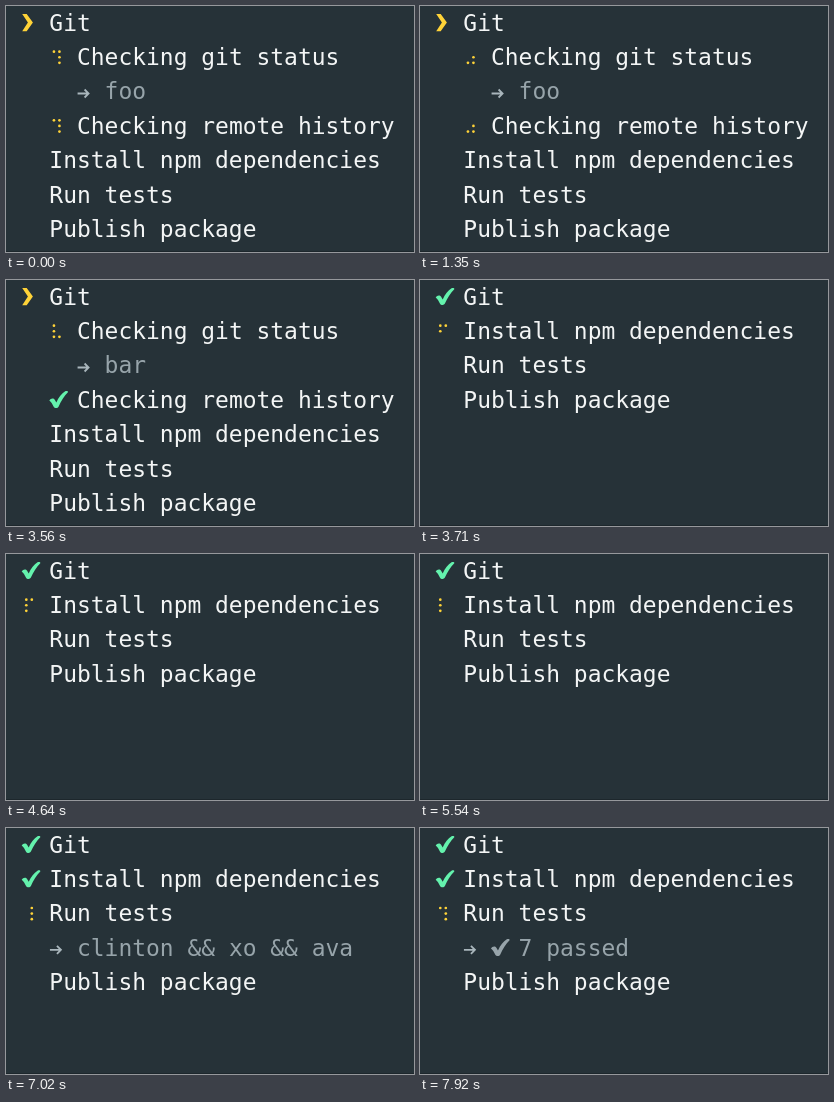
These frames come from a looping animation (408 px wide and 246 px high, 8 s). An HTML page:

```html
<!DOCTYPE html>
<html lang="en">
<head>
<meta charset="utf-8">
<title>Release tasks</title>
<style>
  html, body { margin: 0; width: 100%; height: 100%; overflow: hidden; background: #263238; }
  svg { display: block; width: 408px; height: 246px; }
  text { font: 22.95px "DejaVu Sans Mono", monospace; white-space: pre; }
</style>
</head>
<body>
<svg id="screen" viewBox="0 0 408 246"></svg>
<script>
const LOOP = 8000;
const COL = 13.82, ROW = 34.35, LEFT = 15.7, BASELINE = 24.8;
const WHITE = '#f3f5f5', DIM = '#97a4aa', YELLOW = '#ffd338', GREEN = '#64f2ad';

// Screen refreshes: [first, last, count], one every REFRESH ms until the last.
const REFRESH = 150;
const refreshes = [
  [0, 0, 1], [140, 1060, 7], [1200, 2240, 8], [2390, 3420, 8], [3560, 4490, 7],
  [4640, 5680, 8], [5830, 6870, 8], [7020, 7920, 7]
].flatMap(([first, last, count]) =>
  Array.from({ length: count }, (_, i) => i === count - 1 ? last : first + i * REFRESH));

// Spinner ticks at which the task list changes.
const TICK = 102, FIRST_TICK = 2.73;
const REMOTE_DONE = 19, GIT_DONE = 39, INSTALL_DONE = 58, TESTS_PASSED = 78;
const SPINNER = '⠋⠙⠹⠸⠼⠴⠦⠧⠇⠏';

const colX = col => LEFT + col * COL;
const at = (col, row, body) =>
  `<g transform="translate(${colX(col)} ${row * ROW})">${body}</g>`;
const text = (col, row, value, color = WHITE) =>
  at(col, row, `<text y="${BASELINE}" fill="${color}">${value.replace(/&/g, '&amp;')}</text>`);

const shape = (d, color) => `<path d="${d}" fill="${color}"/>`;
const pointer = (col, row) =>
  at(col, row, shape('M.5 8H5L11.2 16.6 5 25.2H.5L6.2 16.6Z', YELLOW));
const check = (col, row, color = GREEN) => at(col, row, shape(
  'M0 17.5C1.2 15.2 4.2 14.8 5.4 16.7L7 19.4C9.3 14.5 12.3 10.5 15.8 8.3' +
  'C17 7.7 19 7.9 18.6 9.2 14.8 13 11.8 18 9.2 23.6 8.4 25.4 5.2 25.4 4.2 23.4 3 21 1.8 18.8 0 17.5Z', color));
const arrow = (col, row) => at(col, row,
  '<path d="M.6 18.8H11.6M7.6 14.8L11.6 18.8 7.6 22.8" fill="none" stroke="#a9b6bc" stroke-width="1.8"/>');

function spinner(col, row, step) {
  const bits = SPINNER.charCodeAt(step % 10) - 0x2800;
  let dots = '';
  for (let i = 0; i < 6; i++) {
    if (bits >> i & 1) {
      dots += `<circle cx="${i < 3 ? 4.6 : 10.1}" cy="${11.3 + i % 3 * 5.6}" r="1.35" fill="${YELLOW}"/>`;
    }
  }
  return at(col, row, dots);
}

const output = (col, row, value) => arrow(col, row) + text(col + 2, row, value, DIM);
const titles = (row, ...names) => names.map((name, i) => text(2, row + i, name)).join('');

function gitView(tick) {
  const remoteDone = tick >= REMOTE_DONE;
  return pointer(0, 0) + text(2, 0, 'Git') +
    spinner(2, 1, tick) + text(4, 1, 'Checking git status') +
    output(4, 2, remoteDone ? 'bar' : 'foo') +
    (remoteDone ? check(2, 3) : spinner(2, 3, tick)) + text(4, 3, 'Checking remote history') +
    titles(4, 'Install npm dependencies', 'Run tests', 'Publish package');
}

function installView(tick) {
  return check(0, 0) + spinner(0, 1, tick - GIT_DONE) +
    titles(0, 'Git', 'Install npm dependencies', 'Run tests', 'Publish package');
}

function testView(tick) {
  const result = tick >= TESTS_PASSED
    ? arrow(2, 3) + check(4, 3, DIM) + text(6, 3, '7 passed', DIM)
    : output(2, 3, 'clinton && xo && ava');
  return check(0, 0) + check(0, 1) + spinner(0, 2, tick - INSTALL_DONE) +
    titles(0, 'Git', 'Install npm dependencies', 'Run tests') + result +
    titles(4, 'Publish package');
}

const screen = document.getElementById('screen');
const start = performance.now();
let shown = -1;

function draw() {
  const time = (performance.now() - start) % LOOP;
  const refreshed = refreshes.findLast(moment => moment <= time);
  if (refreshed !== shown) {
    shown = refreshed;
    const tick = Math.floor(FIRST_TICK + refreshed / TICK);
    const view = tick < GIT_DONE ? gitView : tick < INSTALL_DONE ? installView : testView;
    screen.innerHTML = view(tick) + '<rect y="245" width="408" height="1" fill="#1d272c"/>';
  }
  requestAnimationFrame(draw);
}
draw();
</script>
</body>
</html>
```
